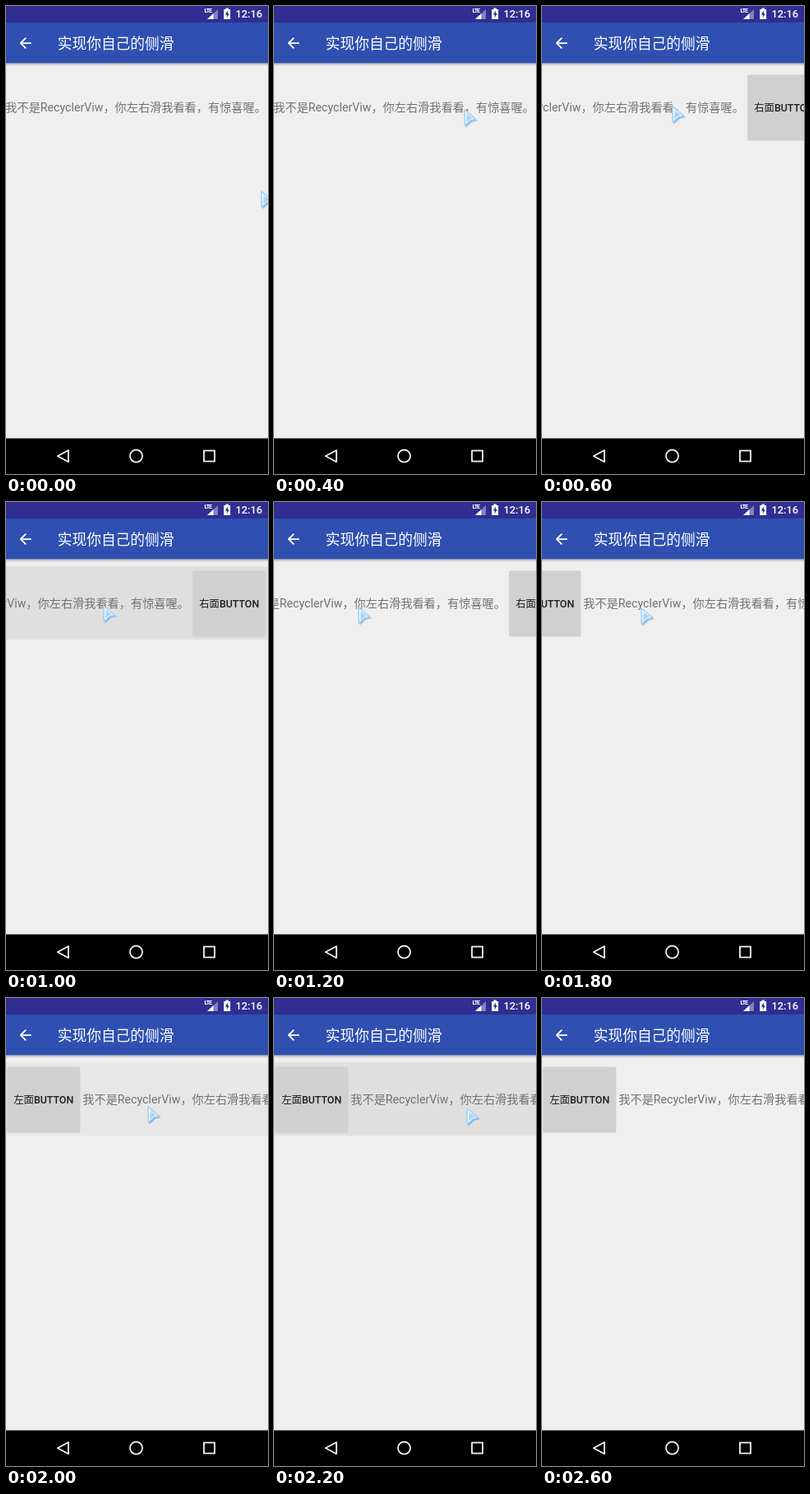
Write an HTML page that moves like this. It is 319 px wide and 568 px high and loops after 3000 ms.

```html
<!DOCTYPE html>
<html lang="zh-CN">
<head>
<meta charset="utf-8">
<style>
html, body { margin: 0; width: 100%; height: 100%; overflow: hidden; background: #efefef; }
svg { display: block; width: 319px; height: 568px; }
text { font-family: Roboto, "Noto Sans CJK SC", "Noto Sans CJK", sans-serif; white-space: pre; }
.label { font-size: 12.4px; font-weight: 500; fill: #1c1c1c; text-anchor: middle; }
.lte { font-size: 7px; font-weight: 700; letter-spacing: -1px; }
</style>
</head>
<body>
<svg viewBox="0 0 319 568">
  <defs>
    <linearGradient id="shade" x2="0" y2="1">
      <stop offset="0" stop-color="#000" stop-opacity=".27"/>
      <stop offset="1" stop-color="#000" stop-opacity="0"/>
    </linearGradient>
    <linearGradient id="glass" x2="1" y2="1">
      <stop offset="0" stop-color="#c4e4f8"/>
      <stop offset=".5" stop-color="#a2d2f4"/>
      <stop offset="1" stop-color="#cfeafb"/>
    </linearGradient>
    <g id="button">
      <rect y=".5" width="89" height="79.6" rx="2" fill="#c4c4c4" opacity=".5"/>
      <rect width="89" height="79.4" rx="2" fill="#d0d0d0"/>
    </g>
  </defs>

  <rect width="319" height="568" fill="#efefef"/>
  <rect id="press" y="78" width="319" height="89" fill="#dfdfdf"/>

  <g id="row">
    <text x="-.7" y="128" font-size="14.18" fill="#727272">我不是RecyclerViw，你左右滑我看看，有惊喜喔。</text>
    <g transform="translate(-92.8 83.5)">
      <use href="#button"/>
      <text class="label" x="44.5" y="44.4">左面BUTTON</text>
    </g>
    <g transform="translate(321.2 83.5)">
      <use href="#button"/>
      <text class="label" x="44.5" y="44.4">右面BUTTON</text>
    </g>
  </g>

  <rect y="69" width="319" height="4" fill="url(#shade)"/>
  <rect width="319" height="69.3" fill="#2f50b0"/>
  <rect width="319" height="20" fill="#302e90"/>

  <g fill="#fff">
    <text class="lte" x="241.6" y="8.4">LTE</text>
    <path d="M258 4V16H245Z" opacity=".4"/>
    <path d="M252.5 9V16H245Z"/>
    <path d="M267.5 2.6h3.4v1.3h2.2V16h-7.9V3.9h2.3Z"/>
    <path d="M270 5.4l-3.2 5h2v3.8l3-5.2H270Z" fill="#302e90"/>
    <text x="279.5" y="14" font-size="12.8" font-weight="500">12:16</text>
    <path transform="translate(13 34.4) scale(.886)" d="M20 11H7.83l5.59-5.59L12 4l-8 8 8 8 1.41-1.41L7.83 13H20Z"/>
    <text x="62.8" y="52" font-size="17.72">实现你自己的侧滑</text>
  </g>

  <rect y="524.7" width="319" height="44"/>
  <g fill="none" stroke="#f4f4f4" stroke-width="1.8" stroke-linejoin="round">
    <path d="M62.8 546.2L76 539.2V553.2Z"/>
    <circle cx="158.5" cy="546.2" r="7.5"/>
    <rect x="241" y="539.7" width="13" height="13"/>
  </g>

  <g id="cursor" stroke-linejoin="round">
    <path d="M3.4 4L16.6 14.8L10.4 16.2L4 22.2Z" fill="#4a8fd6" stroke="#6aa6e0" stroke-width="1.4" opacity=".65"/>
    <path d="M2 2L15.6 13.4L9 15L2.4 21Z" fill="#f4fbff" stroke="#a4d0f2" stroke-width="1.6"/>
    <path d="M4.2 6L12.2 12.7L8 13.8L4.4 17.4Z" fill="url(#glass)"/>
  </g>
</svg>
<script>
const LOOP = 3000, STEP = 200;
const SLIDE = 94;
// One pose per step: cursor x, cursor y, row offset, press strength
const poses = [
  [309, 223, 0, 0],
  [237, 136, 0, 0],
  [230, 124, 0, 0],
  [157, 120, -71, 0],
  [124, 121, -SLIDE, .5],
  [117, 124, -SLIDE, 1],
  [101, 126, -35, 0],
  [48, 126, 0, 0],
  [66, 126, 0, 0],
  [119, 127, 51, 0],
  [171, 130, SLIDE, .5],
  [233, 132, SLIDE, 1],
  [252, 135, SLIDE, .5],
  [null, null, SLIDE, 0]
];
const el = id => document.getElementById(id);
const row = el("row"), press = el("press"), cursor = el("cursor");

function draw(ms) {
  const i = Math.min(poses.length - 1, Math.floor(ms % LOOP / STEP));
  const [x, y, slide, held] = poses[i];
  row.setAttribute("transform", `translate(${slide} 0)`);
  press.setAttribute("opacity", held);
  cursor.setAttribute("visibility", x === null ? "hidden" : "visible");
  if (x !== null) cursor.setAttribute("transform", `translate(${x} ${y})`);
}

const start = performance.now();
function tick() {
  draw(performance.now() - start);
  requestAnimationFrame(tick);
}
draw(0);
requestAnimationFrame(tick);
</script>
</body>
</html>
```
